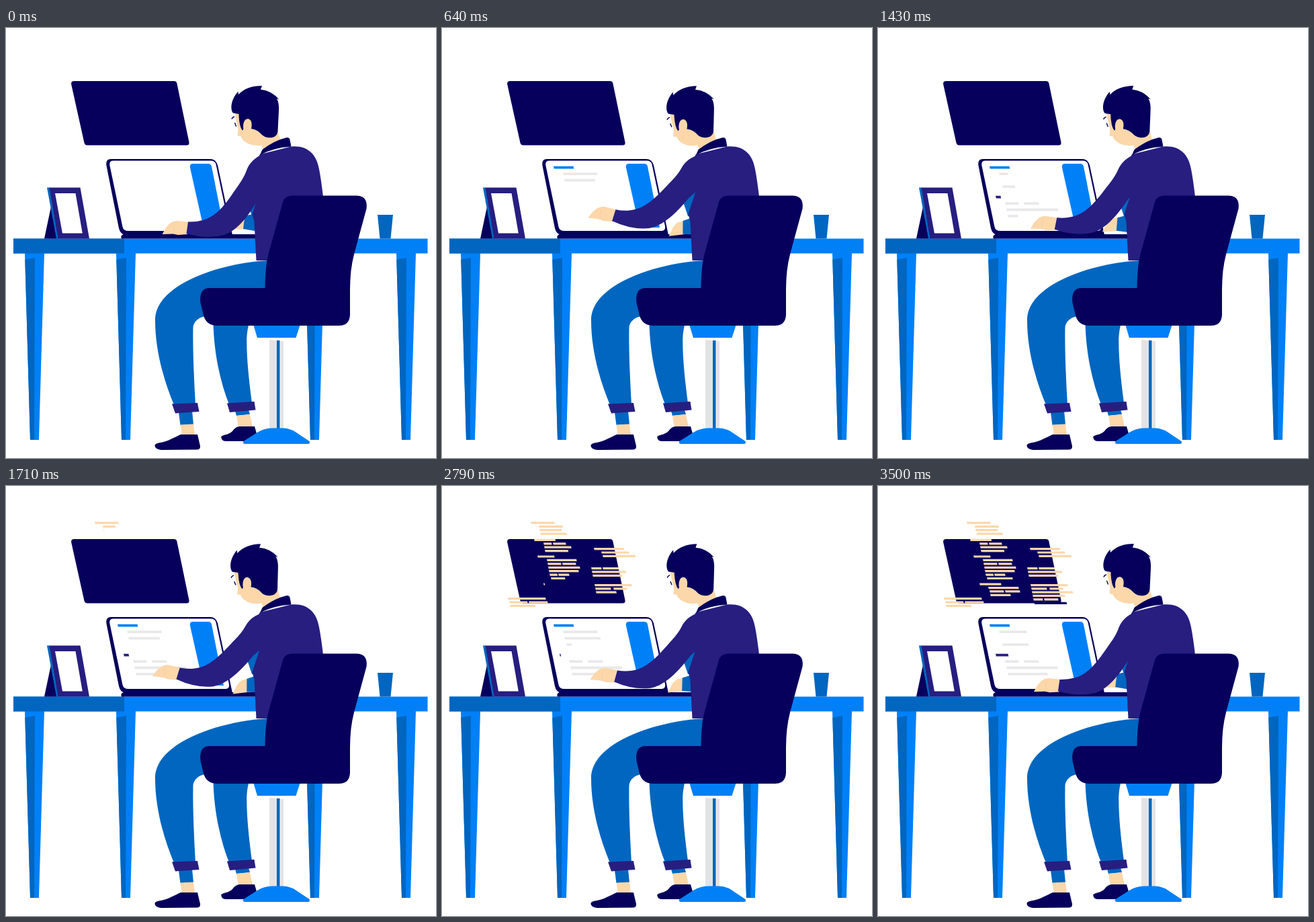
Animation, 640 px wide and 640 px high, one loop 3570 ms. Source, as an HTML page:

```html
<!DOCTYPE html>
<html lang="en">
<head>
<meta charset="utf-8">
<title>At the desk</title>
<style>
html, body { margin: 0; width: 100%; height: 100%; overflow: hidden; background: #fff; }
svg { display: block; width: 100%; height: 100%; }
.navy { fill: #06005c; }
.plum { fill: #271e80; }
.blue { fill: #0080f7; }
.deep { fill: #0066c0; }
.skin { fill: #fcd7aa; }
.grey { fill: #e9e9eb; }
.white { fill: #fff; }
</style>
</head>
<body>
<svg viewBox="0 0 640 640">
  <defs>
    <g id="leg">
      <path class="blue" d="M28 335H57L49 613H36Z"/>
      <path class="deep" d="M28.3 344.500L43 342L42 613H36Z"/>
    </g>
  </defs>

  <!-- wall monitor -->
  <path class="navy" d="M101 79H250Q253.500 79 254.300 82L272.500 170Q273 174.500 269 174.500H121Q117.500 174.500 116.500 171L97.200 84Q96.500 79 101 79Z"/>
  <path id="code" class="skin"/>
  <path id="rule" class="navy"/>

  <!-- desk -->
  <use href="#leg"/><use href="#leg" x="136"/><use href="#leg" x="417"/><use href="#leg" x="553"/>
  <path class="blue" d="M11 313.500H627.500V335.500H11Z"/>
  <path class="deep" d="M11 313.500H176V335.500H11Z"/>
  <path class="deep" d="M553 278H576L572.500 313.500H556.500Z"/>

  <!-- picture frame -->
  <path class="navy" d="M67 266L57 313.500H78Z"/>
  <path class="plum" d="M64 237.500H110.500L124 313.500H77Z"/>
  <path class="deep" d="M61 237.500H64.500L77.500 313.500H75Z"/>
  <path class="white" d="M73 246H103.500L113.800 305.500H84Z"/>

  <!-- laptop -->
  <path class="navy" d="M156 195H304Q312 195 315 204L337 308H178Q170 307 168 298L149.500 205Q148 195 156 195Z"/>
  <path class="white" d="M160 197.500H305Q311 197.500 312.500 203L332 295Q333 302 327 302H182Q175 302 173.500 296L154.500 205Q153 197.500 160 197.500Z"/>
  <path class="blue" d="M278 202H301Q305 202 306 206L324 297H298Q294 297 293 293L274 208Q273 202 278 202Z"/>
  <path id="title" class="blue"/><path id="mark" class="plum"/><path id="text" class="grey"/>
  <path class="navy" d="M175 307H372V313.500H172Q170 309 175 307Z"/>

  <!-- far arm -->
  <path class="deep" d="M382 238L358 256L366 280H380Z"/>
  <g id="farArm">
    <path class="skin" d="M357 279.500L347 281L340 287L332 299.500H356Z"/>
    <path class="deep" d="M355.500 279.500L382 274V304L353 299Z"/>
  </g>

  <!-- legs -->
  <path class="deep" d="M308.500 436C309 480 318 525 332 560L366 558C361 520 358 490 358.300 462Q359 447 363 436Z"/>
  <path class="deep" d="M341 570L361 568L363 575L343 577Z"/>
  <path class="skin" d="M343 577L363 575L367 594H346Z"/>
  <path class="plum" d="M329 558.500L369.500 556L371.500 568.500L333 572Z"/>
  <path class="navy" d="M320.500 610C319 605 330 607 337 600Q342 593 348 593H370L374 607Q374 615 366 615H328Q321 615 320.500 610Z"/>
  <path class="deep" d="M392 346C330 348 222 378 222 435C222 480 235 525 250 561L282 560C279 510 278 470 278.500 445C280 436 287 431 296 429L392 425Z"/>
  <path class="deep" d="M257 572L277 570L279 590L259.500 591Z"/>
  <path class="skin" d="M259.500 590.500L279 589.500L281 606H262Z"/>
  <path class="plum" d="M247 559.500L285 558L287.500 571L252 573.500Z"/>
  <path class="navy" d="M221.500 622C221 617 231 618 241 614L260 605H285L289 622Q289.500 627.500 284 627.500L231 628Q222 627 221.500 622Z"/>

  <!-- chair stand -->
  <path class="blue" d="M368 441H438L431.500 461H374Z"/>
  <path fill="#e2e3e4" d="M392 464L413 466V598H392Z"/>
  <path class="white" d="M407.500 465H408.500V598H407.500Z"/>
  <path class="deep" d="M403 465H407.500V598H403Z"/>
  <path class="blue" d="M353.500 615L374 602Q384 595.500 396 595.500H412Q424 596 432 602L451.500 615Q453.500 619 449 619H356Q351.500 619 353.500 615Z"/>

  <!-- head -->
  <path class="skin" d="M370 150L405 155L409 170L383 181Z"/>
  <g id="head">
    <path class="skin" d="M340 124L342.500 138L345.500 151L344.500 160.500L349.500 161Q351 167 360 172Q370 176.500 383 174L396 158L380 122Z"/>
    <path class="navy" d="M338 126.500C334 122 333.500 108 345.500 94.500L346 99Q358 86 381 86L379 91.500Q395 93 406.500 106.500L403 105Q407 112 406 124L404.500 154C403 166 387 165 381 159Q374 151 365.500 150L356 147L352 152.500Q347 147 346.500 128Z"/>
    <path class="skin" d="M353 147C353 138 357 134 361.500 135.500C367 138 366 146 364.500 152L354 156Z"/>
    <path fill="none" stroke="#06005c" stroke-width="1.400" d="M336 135.500Q337 132.500 340 132M340.500 141L342.500 146.500"/>
  </g>

  <!-- torso and chair -->
  <path class="plum" d="M378 188L424 176.500C448 174 462 187 466 210Q469 225 472.500 255L440 346H372.500L369.500 288L366.500 277L378 242L368 205Z"/>
  <path class="navy" d="M378 189L381.500 181Q400 167 418 163Q422 163 422.500 166L424.500 176.500Q398 178 378 189Z"/>
  <path class="navy" d="M426 249.500H522Q539 250 536.500 269L518 337Q512 360 512 390V427Q511 443 496 443H313Q298 442 294 428L289.500 409Q287 387 303 387H385.500C386 365 387 350 391 335L412 259Q415 249.500 426 249.500Z"/>

  <g id="nearArm">
    <path class="skin" d="M232.500 307L238 297L244 290.500Q249 287 254 287L273 288.500L270 307L256 308L249 306.500Z"/>
    <path fill="none" stroke="#f4cda0" stroke-width=".7" d="M250 292V307"/>
    <path class="plum" d="M358 212C362 201 370 193 382 188L400 205L388 240L376 254C362 278 345 301 325 308Q299 315 268.500 306L271 288.500Q283 289 293 286C318 280 335 249 346 234Q355 221 358 212Z"/>
  </g>
</svg>
<script>
const $ = id => document.getElementById(id);
const FRAMES = 50, STEP = 71.4;

// Each track is time, value, time, value, ...
function track(k, n) {
  if (n <= k[0]) return k[1];
  for (let i = 2; i < k.length; i += 2)
    if (n <= k[i])
      return k[i - 1] + (k[i + 1] - k[i - 1]) * (n - k[i - 2]) / (k[i] - k[i - 2]);
  return k[k.length - 1];
}

const bar = (x, y, w, h) => w < .3 ? '' : `M${x} ${y}h${w}l${h * .22} ${h}h${-w}z`;

// Laptop lines: layer, x, y, width, track
const lines = [
  ['title', 166, 205.8, 29.5, [0, 0, 4, 1, 11, 1, 14, 0, 16, 0, 20, 1]],
  ['text', 180, 215.3, 51, [2, 0, 7, 1, 13, 1, 19, 0, 23, 1, 28, 1, 31, 0, 33, 0, 37, 1, 41, 1, 44, 0, 45, 0, 50, 1]],
  ['text', 182, 224.8, 58, [4, 0, 10.4, 1, 15, 1, 20, 0, 25, 1, 27, 1, 29, 0, 33, 1, 38.6, 1, 44, 0]],
  ['text', 185, 234.2, 46.5, [9, 0, 14, 1, 17, 1, 22, 0, 26, 0, 31, 1, 34, 1, 40, 0, 44, 0, 50, 1]],
  ['mark', 175, 249.8, 18.5, [11, 0, 14, 1, 17, 1, 22, 0, 27, 1, 33, 1, 39.5, 0, 41, 0, 46, 1]],
  ['text', 189, 259.2, 20, [12, 0, 15.7, 1]],
  ['text', 217, 259.2, 22, [14.9, 0, 18, 1]],
  ['text', 191, 268.6, 76.5, [12, 0, 16.5, 1]],
  ['text', 193, 278, 59, [18, 0, 26, 1]]
];

// Monitor blocks: pace of the typed row, then rows of y, x, width (, x, width)
const blocks = [
  { pace: [22, 0, 32, 10.2, 39, 15.1, 48, 21], rows: [
    [53.3, 132, 35], [58.7, 144, 35.5], [64, 145, 33], [69.5, 146.5, 39], [78.8, 137, 31.5],
    [84.2, 151, 12, 165, 19], [89.6, 152, 40], [95, 153, 34.5], [103.4, 142, 25],
    [108.8, 156, 44], [114.2, 157, 20, 179, 20], [119.7, 158, 47], [125, 159, 44],
    [130.5, 160, 11.5, 173, 16], [135.9, 162, 38], [144.5, 151, 32], [150, 164, 45],
    [155.2, 166, 21, 189, 22], [160.7, 167, 30]] },
  { pace: [26, 0, 32, 5.3, 39, 9, 48, 13], rows: [
    [92, 226, 44.5], [97.4, 237, 41], [102.8, 239, 48.5], [121, 222, 15, 239, 24],
    [126.3, 223, 50.5], [131.7, 224, 44], [146, 227, 55], [151.2, 228, 23, 255, 20],
    [156.5, 229, 60.5], [161.8, 230, 48], [167.2, 231, 14, 247, 21]] },
  { pace: [24, 0, 29, 5], rows: [
    [166, 98, 56], [171.4, 100, 27, 129, 28], [176.8, 101, 37.5]] }
];

function draw(n) {
  const lift = (1 - Math.cos(6 * Math.PI * n / FRAMES)) / 2;
  $('nearArm').setAttribute('transform', `rotate(${9.2 * lift} 380 200)`);
  $('farArm').setAttribute('transform', `rotate(${-7 * lift} 420 258)`);
  $('head').setAttribute('transform', `rotate(${-1.4 * lift} 388 172)`);

  const paths = { title: '', mark: '', text: '', code: '' };
  for (const [layer, x, y, w, k] of lines) paths[layer] += bar(x, y, w * track(k, n), 3.8);
  for (const { pace, rows } of blocks) {
    const front = track(pace, n);
    rows.forEach(([y, ...parts], i) => {
      const p = Math.max(0, Math.min(1, (front - i) / 2));
      for (let j = 0; j < parts.length; j += 2)
        paths.code += bar(parts[j], y, parts[j + 1] * p, 3.2);
    });
  }
  paths.rule = bar(232.5, 172.8, 48 * track([44, 0, 48, 1], n), 3.2);
  for (const id in paths) $(id).setAttribute('d', paths[id]);
}

const start = performance.now();
function tick(now) {
  const t = Math.max(0, now - start);
  draw(Math.floor((t % 3570 + 5.5) / STEP) % FRAMES);
  requestAnimationFrame(tick);
}
draw(0);
requestAnimationFrame(tick);
</script>
</body>
</html>
```
